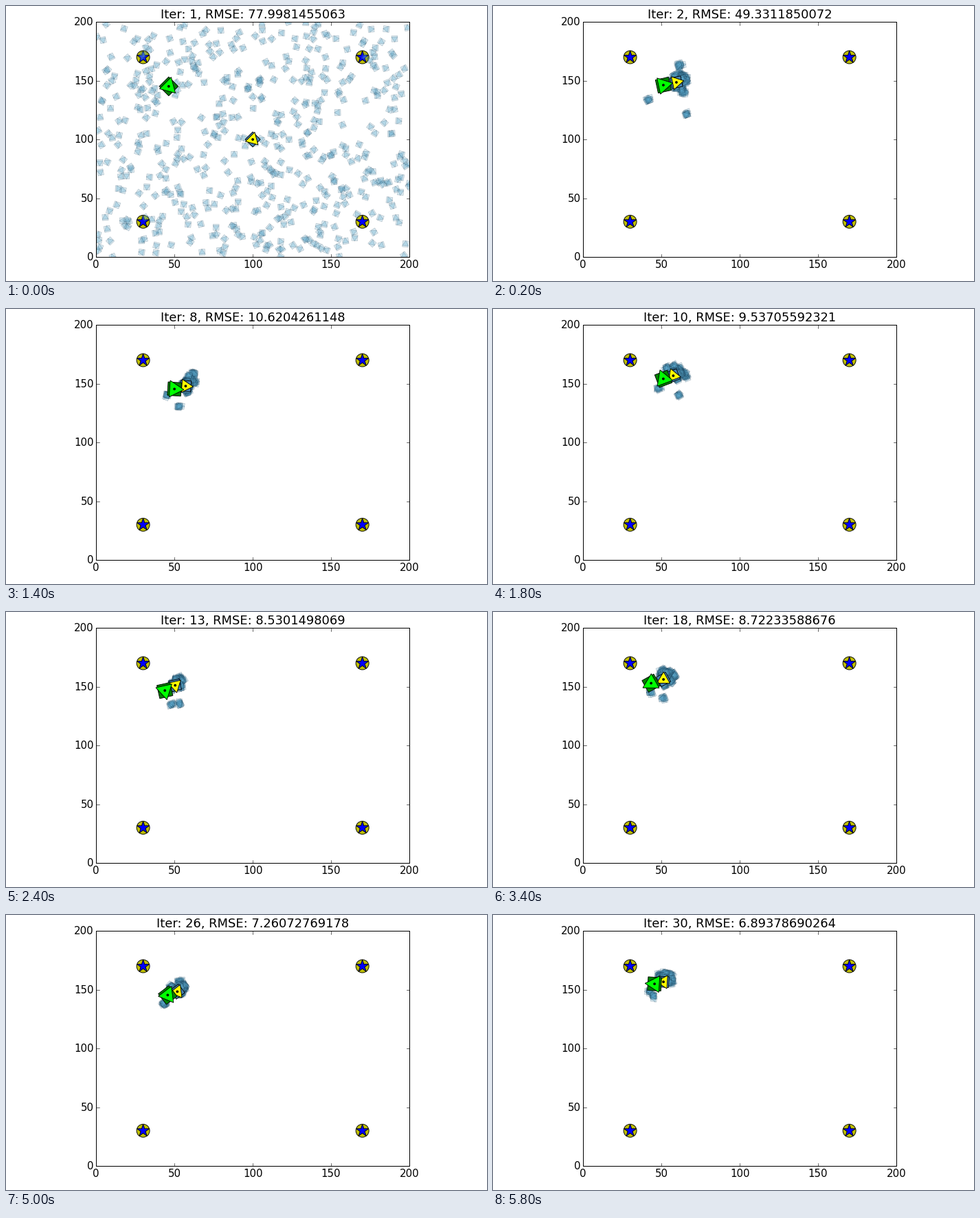
Write a matplotlib script that moves like this. It is 700 by 400 pixels and loops after 6 s.

```python
import numpy as np
import matplotlib.pyplot as plt
from matplotlib.animation import FuncAnimation
from matplotlib.collections import PolyCollection
from matplotlib.patches import Circle, Polygon, Rectangle

W, H = 700, 400
LEFT, RIGHT, TOP, BOTTOM = 131.2, 587, 23.2, 365
WORLD = 200
STEPS = 30
PT = 0.72  # points per pixel at 100 dpi

plt.rcParams["font.family"] = "DejaVu Sans"


def to_px(x, y):
    return (LEFT + (RIGHT - LEFT) * x / WORLD,
            BOTTOM - (BOTTOM - TOP) * y / WORLD)


def ngon(x, y, n, r, angle):
    a = angle + 2 * np.pi * np.arange(n) / n
    return np.column_stack([x + r * np.cos(a), y - r * np.sin(a)])


def star(x, y, r):
    tips = ngon(x, y, 5, r, np.pi / 2)
    notches = ngon(x, y, 5, 0.382 * r, 0.7 * np.pi)
    return np.stack([tips, notches], axis=1).reshape(-1, 2)


# Iteration: RMSE, then the estimate's offset from the robot in pixels
KEYS = {
    1: (77.9981455063, 0, 0),
    5: (12.4805395533, 19, -4),
    10: (9.53705592321, 14.5, -4.5),
    13: (8.5301498069, 15, -7.5),
    18: (8.72233588676, 18, -5.5),
    26: (7.26072769178, 14, -5),
    30: (6.89378690264, 13, -3),
}
KEY_AT = np.array(list(KEYS))
RMSE, EST_DX, EST_DY = np.array(list(KEYS.values())).T

# The robot turns 1 rad and drives 5 units each step, so it walks a circle.
START = np.radians(315)
RADIUS = 5 / (2 * np.sin(0.5))


def robot_pose(i):
    heading = START + i - 1
    a = heading + 0.5 - np.pi / 2
    x, y = to_px(47.8 + RADIUS * np.cos(a), 150.2 + RADIUS * np.sin(a))
    return x, y, heading


def estimate_pose(i):
    x, y, heading = robot_pose(i)
    if i == 1:
        return (*to_px(WORLD / 2, WORLD / 2), heading)
    return (x + np.interp(i, KEY_AT[1:], EST_DX[1:]),
            y + np.interp(i, KEY_AT[1:], EST_DY[1:]), heading)


def rmse(i):
    return np.exp(np.interp(i, KEY_AT, np.log(RMSE)))


def clump(rng, x, y, heading, spread, count):
    tilt = heading + rng.normal(0, 0.25)
    return np.column_stack([rng.normal(x, spread, count),
                            rng.normal(y, spread, count),
                            rng.normal(tilt, 0.15, count)])


def particles(i):
    rng = np.random.default_rng(70 + i)
    if i == 1:
        x, y = to_px(*rng.uniform(0, WORLD, (2, 500)))
        return np.column_stack([x, y, rng.uniform(0, 2 * np.pi, 500)])

    # Resampled clumps close around the estimate, with a few strays below
    x, y, heading = estimate_pose(i)
    spread = 4 + 8 / i
    strays = [clump(rng, x + 6 * spread * np.cos(a), y + 6 * spread * np.sin(a),
                    heading, 1.6, 8)
              for a in rng.uniform(0.4, 0.9, 2) * np.pi]
    core = [clump(rng, *rng.normal((x + 3, y - 4), spread), heading, 1.6, 14)
            for _ in range(18)]
    return np.concatenate(strays + core)


fig = plt.figure(figsize=(W / 100, H / 100), dpi=100, facecolor="white")
ax = fig.add_axes([0, 0, 1, 1])
ax.set_xlim(0, W)
ax.set_ylim(H, 0)
ax.axis("off")

frame = Rectangle((LEFT, TOP), RIGHT - LEFT, BOTTOM - TOP, fill=False,
                  ec="black", lw=PT, zorder=9)
ax.add_patch(frame)


def label(x, y, text, ha="center", size=15):
    return ax.text(x, y, text, ha=ha, va="baseline", fontsize=size * PT)


def tick(xs, ys):
    ax.plot(xs, ys, color="black", lw=0.6 * PT, zorder=9)


for v in range(0, WORLD + 1, 50):
    x, y = to_px(v, v)
    label(x, 381, str(v))
    label(127.5, y + 5, str(v), ha="right")
    for edge, d in ((BOTTOM, -4.5), (TOP, 4.5)):
        tick([x, x], [edge, edge + d])
    for edge, d in ((LEFT, 4.5), (RIGHT, -4.5)):
        tick([edge, edge + d], [y, y])

title = label((LEFT + RIGHT) / 2, 18.5, "", size=17.9)

OUTLINE = dict(ec="black", lw=0.9 * PT)

for mx in (30, 170):
    for my in (30, 170):
        x, y = to_px(mx, my)
        ax.add_patch(Circle((x, y), 9.5, fc=(0.75, 0.75, 0), zorder=2,
                            **OUTLINE))
        ax.add_patch(Polygon(star(x, y, 9.5), fc="blue", zorder=2.1,
                             **OUTLINE))

BLUE = (0.36, 0.66, 0.8)
cloud = PolyCollection([], facecolors=[(*BLUE, 0.24), (*BLUE, 0.3)],
                       edgecolors=[(0, 0.1, 0.18, 0.24)],
                       linewidths=0.6 * PT, zorder=3)
ax.add_collection(cloud, autolim=False)
cloud.set_clip_path(frame)


class Marker:
    """Square body, triangle for the heading and a dot in the middle."""

    def __init__(self, body, arrow, r, z):
        self.r = r
        start = np.zeros((3, 2))
        self.body = ax.add_patch(Polygon(start, fc=body, zorder=z, **OUTLINE))
        self.arrow = ax.add_patch(
            Polygon(start, fc=arrow, zorder=z + 0.1, **OUTLINE))
        self.dot = ax.add_patch(Circle((0, 0), 1.9, color="black", lw=0,
                                       zorder=z + 0.2))

    def place(self, x, y, heading):
        self.body.set_xy(ngon(x, y, 4, self.r, heading + np.pi / 4))
        self.arrow.set_xy(ngon(x, y, 3, self.r, heading))
        self.dot.center = (x, y)


estimate = Marker("steelblue", "yellow", 11, 4)
robot = Marker("green", "lime", 13.8, 5)


def draw(n):
    i = n + 1
    title.set_text(f"Iter: {i}, RMSE: {rmse(i):.12g}")
    shapes = []
    for x, y, a in particles(i):
        shapes += [ngon(x, y, 4, 6.2, a + np.pi / 4), ngon(x, y, 3, 5, a)]
    cloud.set_verts(shapes)
    estimate.place(*estimate_pose(i))
    robot.place(*robot_pose(i))
    return []


anim = FuncAnimation(fig, draw, frames=STEPS, interval=200, repeat=True,
                     repeat_delay=0, blit=False)
plt.show()
```
